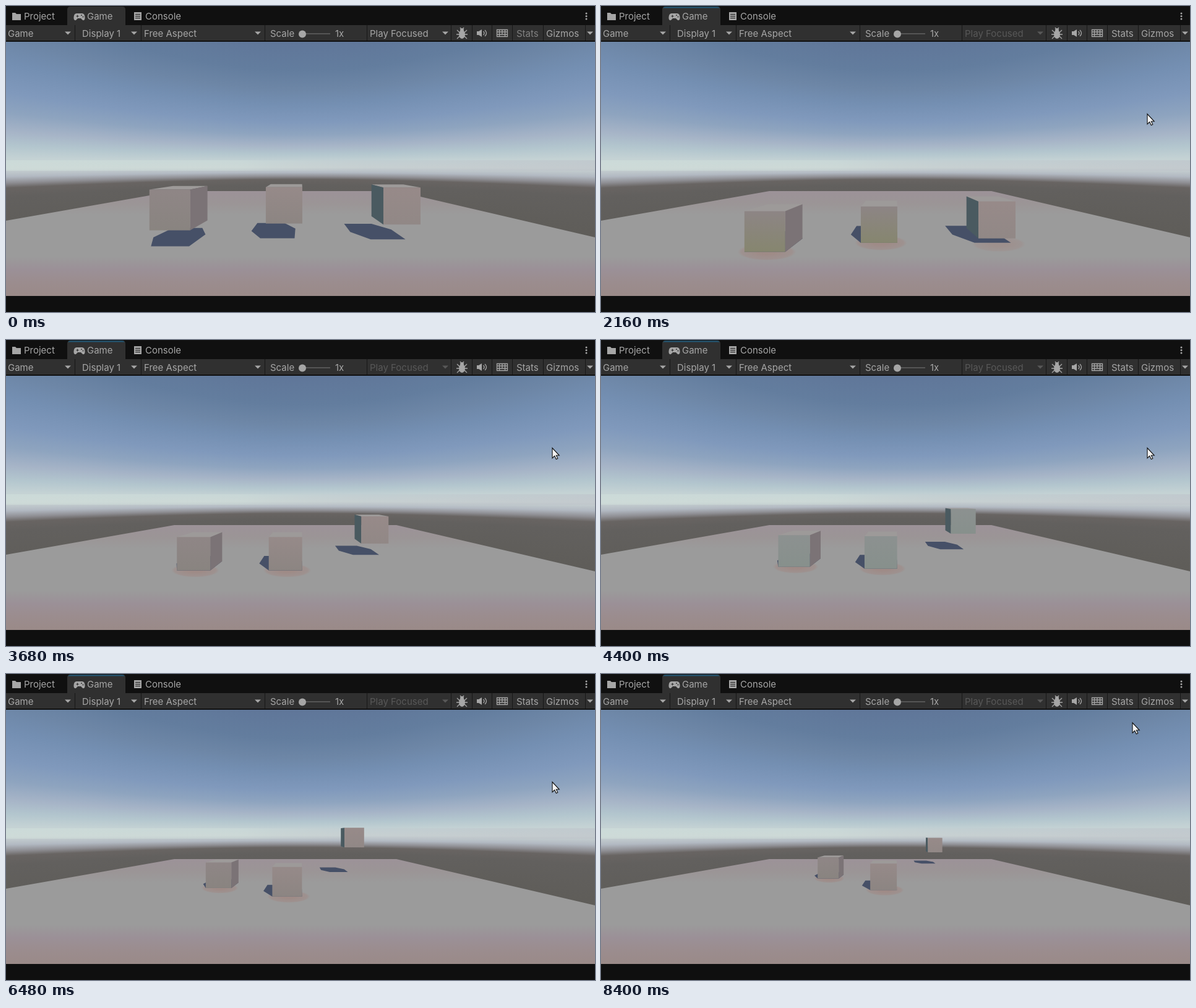
An HTML page with a canvas for the animation above (8.48 s loop, 952 px wide and 496 px high).

```html
<!DOCTYPE html>
<html lang="en">
<head>
<meta charset="utf-8">
<title>Falling cubes</title>
<style>
  html, body { margin: 0; width: 100%; height: 100%; overflow: hidden; background: #0f0f0f; }
  canvas, svg { position: absolute; left: 0; top: 0; display: block; }
  text { font: 15px Inter, Roboto, sans-serif; fill: #a6a6a6; }
  .icon { fill: #a6a6a6; }
  .line { stroke: #a6a6a6; fill: none; stroke-width: 1.3; }
</style>
</head>
<body>
<canvas id="scene" width="952" height="496"></canvas>
<svg width="952" height="496" viewBox="0 0 952 496">
  <rect width="952" height="58" fill="#101010"/>
  <path d="M99 31V6q0-5 5-5h84q5 0 5 5v25z" fill="#303030"/>
  <path id="accent" d="M100 3.5Q101 1 104 1h84q3 0 4 2.5z" fill="#23526c"/>
  <rect y="31" width="952" height="25" fill="#303030"/>
  <g id="seps" fill="#171717"></g>

  <path class="icon" d="M10 11h5l2 2h7v10H10z"/>
  <text x="29" y="22">Project</text>
  <path class="icon" d="M115 12h8q4 0 4.5 6t-3.500 5l-3-3h-5l-3 3q-4 1-3.500-5t4.500-6z"/>
  <path d="M113.500 16.500h4M115.500 14.500v4" stroke="#303030" stroke-width="1.2"/>
  <circle cx="122" cy="15" r="1" fill="#303030"/><circle cx="124.500" cy="17.500" r="1" fill="#303030"/>
  <text x="131" y="22">Game</text>
  <path class="icon" d="M207 10h12v13h-12z"/>
  <path d="M209 13.500h8M209 16.500h8M209 19.500h8" stroke="#101010" stroke-width="1.2"/>
  <text x="225" y="22">Console</text>
  <g class="icon"><circle cx="938" cy="12" r="1.5"/><circle cx="938" cy="16.500" r="1.5"/><circle cx="938" cy="21" r="1.5"/></g>

  <text x="3" y="49.500">Game</text>
  <text x="123" y="49.500">Display 1</text>
  <text x="223" y="49.500">Free Aspect</text>
  <text x="427" y="49.500">Scale</text>
  <rect x="484" y="44" width="40" height="2" fill="#555"/>
  <circle class="icon" cx="479" cy="45.500" r="6"/>
  <text x="532" y="49.500">1x</text>
  <text id="focus" x="588" y="49.500">Play Focused</text>
  <text id="stats" x="825" y="49.500">Stats</text>
  <text x="873" y="49.500">Gizmos</text>
  <g id="arrows" class="icon"></g>

  <ellipse class="icon" cx="737" cy="46" rx="5" ry="7"/>
  <circle class="icon" cx="737" cy="39" r="3"/>
  <path class="line" d="M729 39l4 4M745 39l-4 4M728 46h18M729 53l4-4M745 53l-4-4M734 35l1.500 2M740 35l-1.500 2"/>
  <path class="icon" d="M761 41h3l5-3v12l-5-3h-3z"/>
  <path class="line" d="M771.500 41q3 3 0 6M774 39q5 5 0 10"/>
  <path class="line" d="M793.500 38.500h17v11h-17zM793.500 42h17M793.500 46h17M797.500 38.500v7.500M802 38.500v7.500M806.500 38.500v7.500M797.500 46v3.500M806.500 46v3.500"/>

  <path id="cursor" d="M0 0V16.500L3.700 13L6.300 18.300L8.800 17.100L6.300 12H11.200z" fill="#f4f4f4" stroke="#111" stroke-width="1.1"/>
</svg>
<script>
const LOOP = 8480, STEP = 80, START = 80;
const CX = 476, HORIZON = 260, FOCAL = 357, EYE = 2.1, TOP = 58, FLOOR = 470;
const $ = id => document.getElementById(id);
const canvas = $('scene'), ctx = canvas.getContext('2d');

$('seps').innerHTML = [111, 218, 418, 583, 719, 753, 785, 818, 868, 936]
  .map(x => `<rect x="${x}" y="31" width="1" height="25"/>`).join('');
$('arrows').innerHTML = [100, 207, 407, 710, 944]
  .map(x => `<path d="M${x - 5} 41.500h10l-5 5z"/>`).join('');
const focusArrow = $('arrows').children[3];

// Keys: [time, value]; rise starts where the pushes begin.
const PUSH = 2840;
const key = (...sizes) => [PUSH, 3680, 5040, 6480, 8400].map((t, i) => [t, FOCAL / sizes[i]]);
const cubes = [
  { x: -3.7, z: key(66, 54, 49, 41.4, 34), face: ['#8f8686', '#898480'] },
  { x: -0.95, z: key(59, 54, 51.6, 48, 43), face: ['#968a89', '#8c8582'] },
  { x: 2.233, z: key(60, 44, 37.2, 31.8, 23.4), face: ['#978a89', '#918886'],
    y: [[START, .53], [1440, .25], [2800, .07], [3680, .51], [5040, .97], [6480, 1.44], [8400, .86]] }
];
const pointer = [[320, 740, -20], [880, 883, 175], [8000, 883, 175], [8400, 859, 79]];

function track(keys, t, col = 1) {
  if (t <= keys[0][0]) return keys[0][col];
  for (let i = 1; i < keys.length; i++) {
    const a = keys[i - 1], b = keys[i];
    if (t <= b[0]) return a[col] + (b[col] - a[col]) * (t - a[0]) / (b[0] - a[0]);
  }
  return keys[keys.length - 1][col];
}

const project = (x, y, z) => {
  const w = FOCAL / z;
  return [CX + x * w, HORIZON + (EYE - y) * w];
};

function fill(g, pts, style) {
  g.beginPath();
  pts.forEach(p => g.lineTo(p[0], p[1]));
  g.closePath();
  g.fillStyle = style;
  g.fill();
}

function gradient(g, y0, y1, stops) {
  const grad = g.createLinearGradient(0, y0, 0, y1);
  stops.forEach(([at, color]) => grad.addColorStop((at - stops[0][0]) / (stops[stops.length - 1][0] - stops[0][0]), color));
  return grad;
}

function makeBackdrop() {
  const layer = document.createElement('canvas');
  layer.width = 952;
  layer.height = 496;
  const g = layer.getContext('2d');
  g.fillStyle = '#0f0f0f';
  g.fillRect(0, 0, 952, 496);

  const sky = [[50, '#5f7598'], [105, '#637d9e'], [135, '#6d86a6'], [160, '#748fb2'], [188, '#8099bc'],
    [208, '#8ea4bf'], [226, '#a6b4c7'], [240, '#b3c6ce'], [252, '#c4d2d4'], [262, '#c9d3d3'],
    [270, '#b2b9c2'], [276, '#8f8f94'], [281, '#686462'], [290, '#62605e'], [350, '#5d5b56']];
  // Bands follow equal elevation, so each column stretches around the horizon.
  for (let x = 0; x < 952; x += 2) {
    const k = Math.hypot(FOCAL, x - CX) / FOCAL;
    g.fillStyle = gradient(g, HORIZON + (50 - HORIZON) * k, HORIZON + (350 - HORIZON) * k, sky);
    g.fillRect(x, TOP, 2, FLOOR - TOP);
  }
  const haze = g.createLinearGradient(0, 0, 952, 0);
  haze.addColorStop(0, 'rgba(212,228,222,.45)');
  haze.addColorStop(.4, 'rgba(212,228,222,.3)');
  haze.addColorStop(.62, 'rgba(186,188,198,.15)');
  haze.addColorStop(1, 'rgba(186,188,198,.4)');
  g.fillStyle = haze;
  g.fillRect(0, 250, 952, 17);

  fill(g, [[272, 300], [631, 300], [952, 375], [952, FLOOR], [0, FLOOR], [0, 348]],
    gradient(g, 300, FLOOR, [[300, '#9c9298'], [320, '#9b9596'], [338, '#9b9b9b'], [406, '#9b9b9b'],
      [428, '#9b9097'], [445, '#9b8d8f'], [470, '#9a8a88']]));
  return layer;
}

function hull(pts) {
  pts.sort((a, b) => a[0] - b[0] || a[1] - b[1]);
  const half = list => {
    const out = [];
    for (const p of list) {
      while (out.length > 1) {
        const [a, b] = out.slice(-2);
        if ((b[0] - a[0]) * (p[1] - a[1]) - (b[1] - a[1]) * (p[0] - a[0]) > 0) break;
        out.pop();
      }
      out.push(p);
    }
    return out.slice(0, -1);
  };
  return half(pts).concat(half(pts.slice().reverse()));
}

function drawShadow(x, y, z) {
  const w = FOCAL / z, glow = Math.max(0, 1 - y / .5);
  if (glow) {
    const [gx, gy] = project(x + .55, 0, z);
    ctx.save();
    ctx.translate(gx, gy);
    ctx.scale(w * .72, w * .21);
    const grad = ctx.createRadialGradient(0, 0, .3, 0, 0, 1);
    grad.addColorStop(0, `rgba(160,132,126,${.7 * glow})`);
    grad.addColorStop(.8, `rgba(160,136,132,${.5 * glow})`);
    grad.addColorStop(1, 'rgba(160,140,136,0)');
    ctx.fillStyle = grad;
    ctx.fillRect(-1, -1, 2, 2);
    ctx.restore();
  }
  const pts = [];
  for (const dx of [0, 1]) for (const dy of [0, 1]) for (const dz of [0, 1]) {
    const h = y + dy;
    pts.push(project(x + dx - .42 * h, 0, z + dz + .727 * h));
  }
  fill(ctx, hull(pts), '#465067');
}

function drawCube(x, y, z, face) {
  const at = (dx, dy, dz) => project(x + dx, y + dy, z + dz);
  if (y + 1 < EYE) fill(ctx, [at(0, 1, 0), at(1, 1, 0), at(1, 1, 1), at(0, 1, 1)], '#9d9a99');
  if (x + 1 < 0) fill(ctx, [at(1, 0, 0), at(1, 1, 0), at(1, 1, 1), at(1, 0, 1)], '#7b7376');
  if (x > 0) fill(ctx, [at(0, 0, 0), at(0, 1, 0), at(0, 1, 1), at(0, 0, 1)], '#4a5a60');
  const a = at(0, 1, 0), b = at(1, 0, 0);
  ctx.fillStyle = gradient(ctx, a[1], b[1], [[0, face[0]], [1, face[1]]]);
  ctx.fillRect(a[0], a[1], b[0] - a[0], b[1] - a[1]);
}

function tint(t, face, y) {
  if (t >= 4400 && t < 5700) return ['#8c9190', '#87908c'];
  if (t >= START && t < 3400 && y < .05) return ['#8d8585', '#86866f'];
  return face;
}

const backdrop = makeBackdrop();

function draw(t) {
  const playing = t >= START, fall = (t - START) / 1000;
  ctx.drawImage(backdrop, 0, 0);
  const poses = cubes.map(c => ({
    x: c.x,
    y: c.y ? track(c.y, t) : playing ? Math.max(0, .53 - 4.905 * fall * fall) : .53,
    z: track(c.z, t),
    face: c.face
  })).sort((a, b) => b.z - a.z);
  poses.forEach(p => drawShadow(p.x, p.y, p.z));
  poses.forEach(p => drawCube(p.x, p.y, p.z, tint(t, p.face, p.y)));

  $('accent').style.display = playing ? '' : 'none';
  $('focus').style.fill = focusArrow.style.fill = playing ? '#585858' : '#a6a6a6';
  $('stats').style.fill = playing ? '#a6a6a6' : '#828282';
  $('cursor').style.display = t < 320 ? 'none' : '';
  $('cursor').setAttribute('transform', `translate(${track(pointer, t)} ${track(pointer, t, 2)})`);
}

const begin = performance.now();
function tick() {
  const t = (performance.now() - begin) % LOOP;
  draw(Math.floor(t / STEP) * STEP);
  requestAnimationFrame(tick);
}
tick();
</script>
</body>
</html>
```
